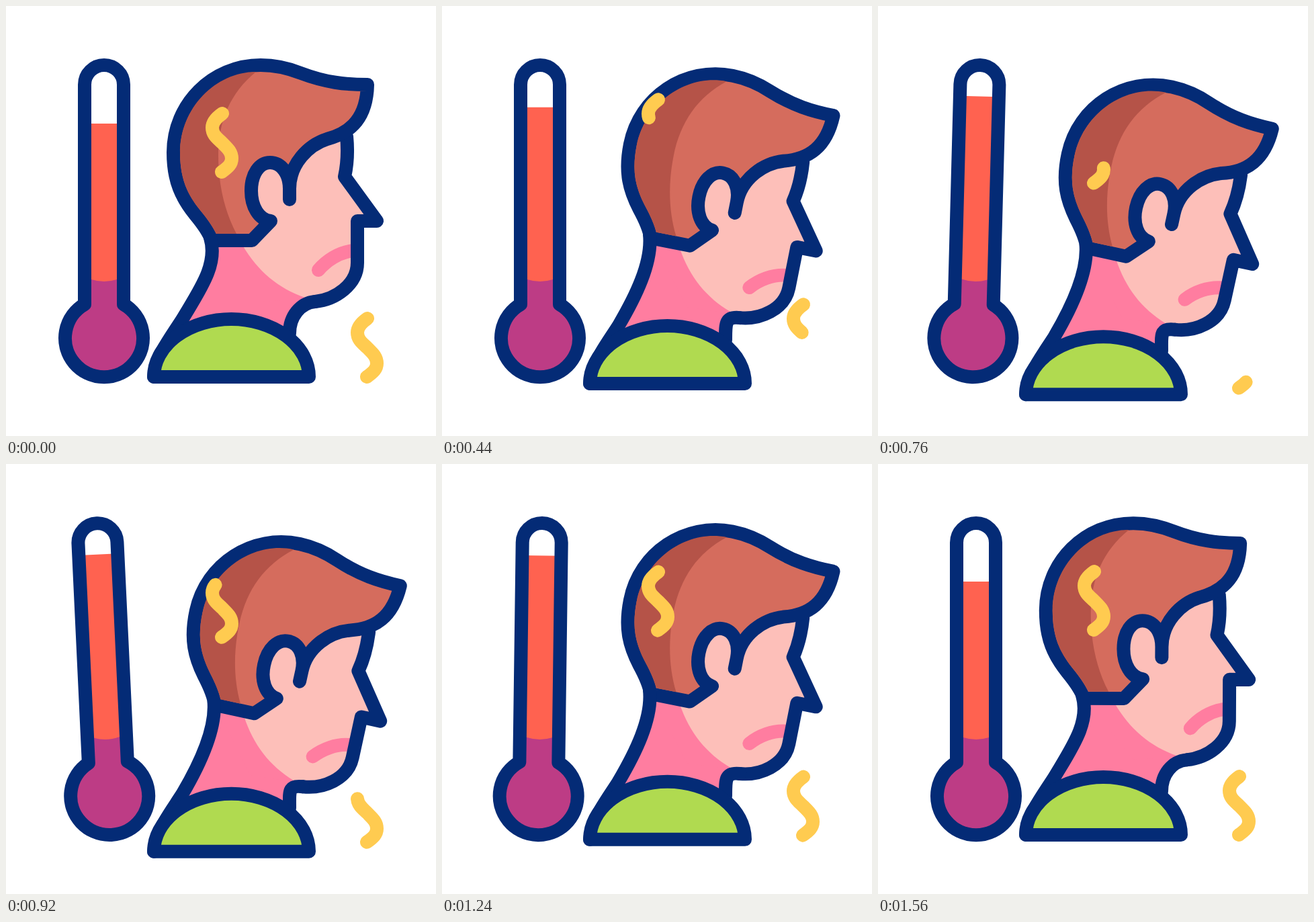
An HTML page for the animation above (1600 ms loop, 640 px wide and 640 px high).

```html
<!DOCTYPE html>
<html lang="en">
<head>
<meta charset="utf-8">
<title>Fever</title>
<style>
  html, body { margin: 0; width: 100%; height: 100%; overflow: hidden; background: #fff; }
  svg { display: block; width: 100%; height: 100%; }
  .line { fill: none; stroke: #042b76; }
  .sweat { fill: none; stroke: #ffcb50; }
</style>
</head>
<body>
<svg viewBox="0 0 640 640" stroke-width="20" stroke-linecap="round" stroke-linejoin="round">
  <g id="thermometer">
    <path id="liquid" fill="#ff6250"/>
    <path fill="#bd3c85" d="M127 407Q146 413 165 407H175V444A58 58 0 1 1 117 444V407Z"/>
    <path class="line" d="M117 444V117A29 29 0 0 1 175 117V444A58 58 0 1 1 117 444Z"/>
  </g>
  <g id="person">
    <path id="neckFill" fill="#ff7da0"/>
    <g id="head">
      <path fill="#ff7da0" d="M303 344H366L455 436 380 440Z"/>
      <path fill="#fdbfb9" d="M352 356C375 395 405 420 445 434L460 440C490 437 523 415 523 382V320H552L504 254C508 236 509 215 507 194L430 190 366 240V349Z"/>
      <path fill="none" stroke="#ff7da0" d="M465 393C476 380 495 366 518 364"/>
      <path class="line" d="M507 194C509 215 508 236 504 254L552 320H523V382C523 415 490 437 460 440"/>
      <path fill="#d56c5d" stroke="#042b76" d="M306 349H366L394 320C376 318 365 298 365 275C365 250 377 233 393 233C410 233 422 250 422 272V288V272C422 235 450 207 478 198C515 188 537 165 538 117C505 117 476 114 439 100C419 92 400 88 379 88C307 88 249 146 249 218C249 262 262 286 281 310C296 328 303 340 306 349Z"/>
      <path fill="#b55348" d="M372 98C334 129 316 171 316 222C316 265 325 305 343 339H313C307 327 299 316 289 304C271 282 259 258 259 218C259 152 312 98 372 98Z"/>
    </g>
    <path id="neckLine" class="line"/>
    <path fill="#b0da50" stroke="#042b76" d="M220 552A115.5 86 0 0 1 451 552Z"/>
  </g>
  <path id="sweatTop" class="sweat" pathLength="1" d="M322 160C312 167 307 173 307 181C307 192 315 197 322 204C330 212 336 217 336 227C336 235 331 240 321 247"/>
  <path id="sweatLow" class="sweat" pathLength="1" d="M538 465C528 472 523 478 523 486C523 497 531 502 538 509C546 517 552 522 552 532C552 540 547 545 537 552"/>
</svg>
<script>
const LOOP = 1600, STEP = 40;
const PIVOT = [379, 363], BEND = 12.3 * Math.PI / 180;
const BOB = [[160, 0], [280, 2.2], [440, 10], [600, 20.5], [780, 26.3], [920, 24.8], [1120, 14.8], [1200, 9.5], [1320, 2], [1400, 0]];
const TILT = [[430, 0], [520, .4], [600, 1.8], [640, 4.2], [690, 5.8], [860, -5.8], [920, -2.7], [1040, 5.8], [1120, 3.8], [1200, 2], [1280, 0]];

const el = id => document.getElementById(id);
const ease = (t, from, to) => {
  const x = Math.min(1, Math.max(0, (t - from) / (to - from)));
  return x * x * (3 - 2 * x);
};

// Smooth curve through [time, value] keys, flat at turning points.
function track(keys, t) {
  const last = keys.length - 1;
  if (t <= keys[0][0]) return keys[0][1];
  if (t >= keys[last][0]) return keys[last][1];
  const slope = i => {
    if (i === 0 || i === last) return 0;
    const [a, b, c] = keys.slice(i - 1, i + 2);
    return (b[1] - a[1]) * (c[1] - b[1]) <= 0 ? 0 : (c[1] - a[1]) / (c[0] - a[0]);
  };
  const i = keys.findIndex(k => k[0] > t) - 1;
  const [t0, v0] = keys[i], [t1, v1] = keys[i + 1];
  const d = t1 - t0, x = (t - t0) / d, s = x * x * (3 - 2 * x);
  return v0 + (v1 - v0) * s + d * x * (1 - x) * ((1 - x) * slope(i) - x * slope(i + 1));
}

// Every point of the head moves on a straight line between upright and bent.
function drawHead(bend) {
  const [px, py] = PIVOT;
  const c = 1 - bend + bend * Math.cos(BEND), s = bend * Math.sin(BEND);
  const turn = (x, y) => `${px + (x - px) * c - (y - py) * s} ${py + (x - px) * s + (y - py) * c} `;
  const neck = `M${turn(304, 345)}C${turn(316, 385)}288 423 262 467C240 501 222 524 220 552` +
    `L422 487C422 462 ${turn(438, 442)}${turn(460, 440)}`;
  el("neckFill").setAttribute("d", neck);
  el("neckLine").setAttribute("d", neck);
  el("head").setAttribute("transform", `matrix(${c} ${s} ${-s} ${c} ${turn(0, 0)})`);
}

function drawSweat(id, t, gone, back) {
  const start = t < 620 ? 0 : 1 - ease(t, ...back);
  const end = t < 620 ? 1 - ease(t, ...gone) : 1;
  const shift = t < 620 ? -28 * ease(t, 120, 600) : 20 * (1 - ease(t, 560, 1320));
  const style = el(id).style;
  style.display = end - start > .001 ? "" : "none";
  style.strokeDasharray = `${end - start} 3`;
  style.strokeDashoffset = -start;
  el(id).setAttribute("transform", `translate(0 ${shift})`);
}

function draw(t) {
  const level = 175 - 40.5 * (ease(t, 180, 640) - ease(t, 1200, 1510));
  drawHead(ease(t, 80, 520) - ease(t, 1160, 1600));
  el("person").setAttribute("transform", `translate(0 ${track(BOB, t)})`);
  el("thermometer").setAttribute("transform", `rotate(${track(TILT, t)} 146 320)`);
  el("liquid").setAttribute("d", `M117 ${level}H175V412H117Z`);
  drawSweat("sweatTop", t, [160, 600], [640, 1000]);
  drawSweat("sweatLow", t, [270, 600], [680, 1040]);
}

function tick() {
  draw(Math.floor(performance.now() % LOOP / STEP) * STEP);
  requestAnimationFrame(tick);
}
tick();
</script>
</body>
</html>
```
